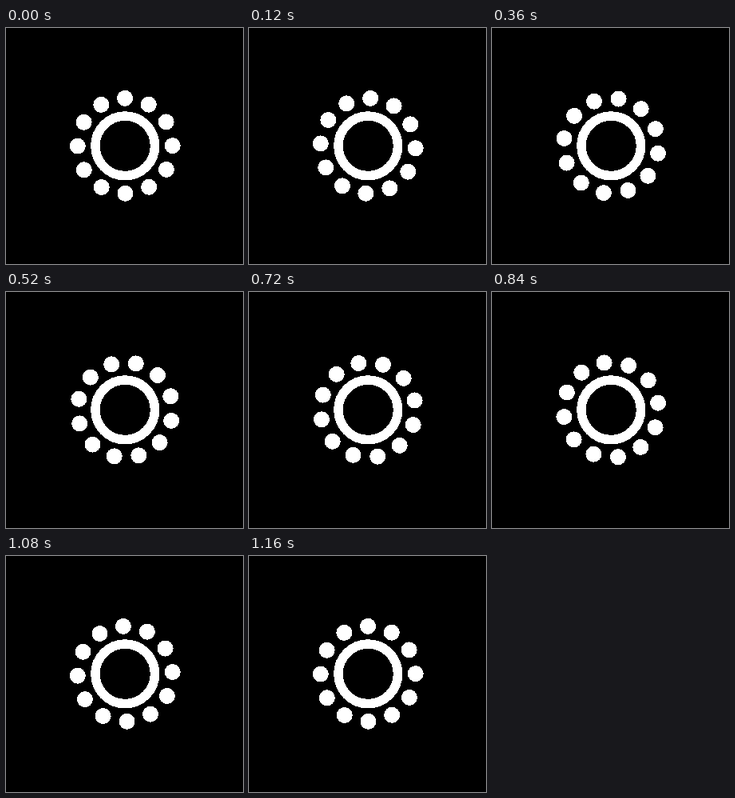
Animation, 297 px wide and 295 px high, one loop 1.2 s. Source, as an HTML page:

```html
<!DOCTYPE html>
<html lang="en">
<head>
<meta charset="utf-8">
<title>Loader</title>
<style>
  html, body {
    margin: 0;
    width: 100%;
    height: 100%;
    overflow: hidden;
    background: #000;
  }
  svg {
    display: block;
    width: 100%;
    height: 100%;
  }
  circle {
    fill: none;
    stroke: #fff;
    shape-rendering: crispEdges;
  }
  .ring {
    stroke-width: 11.6;
  }
  /* twelve zero-length dashes with round caps make the dots */
  .dots {
    stroke-width: 20;
    stroke-linecap: round;
    stroke-dasharray: 0 1;
    animation: turn 1200ms steps(30, jump-none) infinite;
  }
  /* one dash period is a twelfth of a turn; shifting the dashes keeps edges sharp */
  @keyframes turn {
    from { stroke-dashoffset: 0.007; }
    to { stroke-dashoffset: -0.993; }
  }
</style>
</head>
<body>
<svg viewBox="0 0 297 295">
  <g transform="translate(149.25 147.35)">
    <circle class="ring" r="37.3"/>
    <circle class="dots" r="59.5" pathLength="12"/>
  </g>
</svg>
</body>
</html>
```
